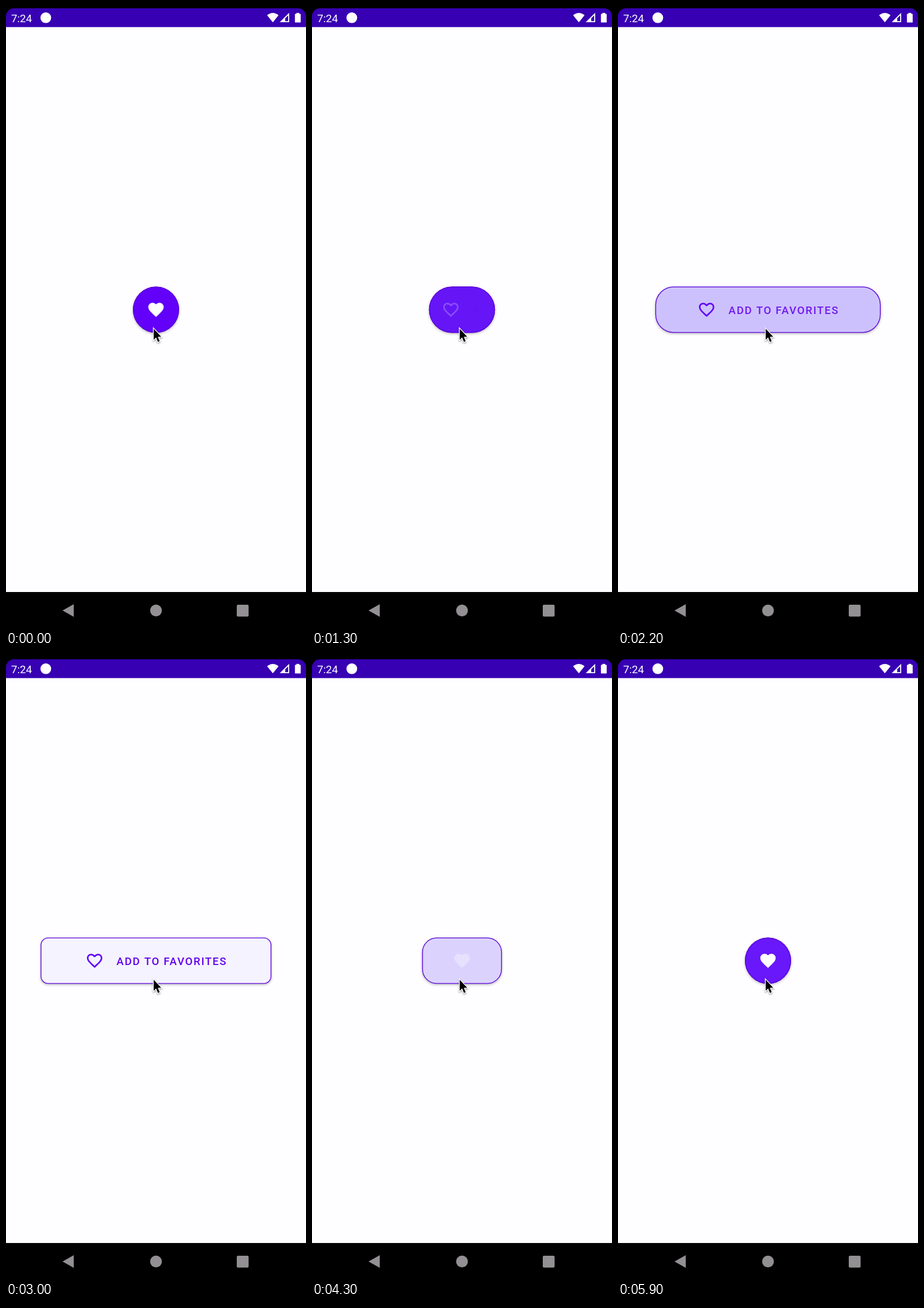
An HTML page with a canvas that plays this animation: 520x1078 px, repeating every 6000 ms.

```html
<!DOCTYPE html>
<html lang="en">
<head>
<meta charset="utf-8">
<title>Favorite button</title>
<style>
  html, body { margin: 0; width: 100%; height: 100%; overflow: hidden; background: #000; }
  canvas { display: block; }
</style>
</head>
<body>
<canvas id="stage" width="520" height="1078"></canvas>
<script>
const ctx = document.getElementById('stage').getContext('2d');
const LOOP = 6000, STEP = 100;
const EXPAND = 1025, COLLAPSE = 3495;   // finger lifts, state flips
const PRESSES = [[650, EXPAND], [3120, COLLAPSE]];
const DP = 4 / 3, CX = 260, CY = 525.5, H = 80;
const BORDER = '#5a00d8';
const GAMMA = 1.87;
const PURPLE = [0.167, -0.012, 0.965], WHITE = [1, 1, 1];

const HEART = 'M16.5 3c-1.74 0-3.41.81-4.5 2.09C10.91 3.81 9.24 3 7.5 3 4.42 3 2 5.42 2 8.5c0 3.78 3.4 6.86 8.55 11.54L12 21.35l1.45-1.31C18.6 15.36 22 12.28 22 8.5 22 5.42 19.58 3 16.5 3z';
const HOLE = 'M12.1 18.55l-.1.1-.1-.1C7.14 14.24 4 11.39 4 8.5 4 6.5 5.5 5 7.5 5c1.54 0 3.04.99 3.57 2.36h1.87C13.46 5.99 14.96 5 16.5 5c2 0 3.5 1.5 3.5 3.5 0 2.89-3.14 5.74-7.9 10.05z';
const solidHeart = new Path2D(HEART);
const lineHeart = new Path2D(HEART + HOLE);

const clamp = v => Math.min(1, Math.max(0, v));
const lerp = (a, b, p) => a + (b - a) * p;

// cubic-bezier(.4, 0, .2, 1)
function ease(v) {
  const x = clamp(v);
  let lo = 0, hi = 1, s = x;
  for (let i = 0; i < 24; i++) {
    s = (lo + hi) / 2;
    const bx = 1.2 * (1 - s) ** 2 * s + 0.6 * (1 - s) * s * s + s ** 3;
    if (bx < x) lo = s; else hi = s;
  }
  return s * s * (3 - 2 * s);
}

// 0 is the round button, 1 the wide one
function openness(t, duration) {
  const opened = ease((Math.min(t, COLLAPSE) - EXPAND) / duration);
  return opened * (1 - ease((t - COLLAPSE) / duration));
}

function mix(p) {
  const rgb = PURPLE.map((c, i) => Math.round(255 * clamp(lerp(c, WHITE[i], p)) ** (1 / GAMMA)));
  return `rgb(${rgb})`;
}

function polygon(points) {
  ctx.beginPath();
  points.forEach(([x, y]) => ctx.lineTo(x, y));
  ctx.closePath();
}

function disc(x, y, r, color) {
  ctx.fillStyle = color;
  ctx.beginPath();
  ctx.arc(x, y, r, 0, Math.PI * 2);
  ctx.fill();
}

function box(x, y, w, h, r, color) {
  ctx.fillStyle = color;
  ctx.beginPath();
  ctx.roundRect(x, y, w, h, r);
  ctx.fill();
}

function shadow(color, blur, dy) {
  ctx.shadowColor = color;
  ctx.shadowBlur = blur;
  ctx.shadowOffsetY = dy;
}

function drawHeart(path, x, color, alpha) {
  ctx.save();
  ctx.globalAlpha = clamp(alpha);
  ctx.translate(x - 12 * DP, CY - 12 * DP);
  ctx.scale(DP, DP);
  ctx.fillStyle = color;
  ctx.fill(path, 'evenodd');
  ctx.restore();
}

function drawStatusBar() {
  box(0, 0, 520, 40, 0, '#000');
  box(0, 4, 520, 40, [14, 14, 0, 0], '#3700b3');
  box(0, 36.5, 520, 977.5, 0, '#fefdff');

  ctx.fillStyle = '#fff';
  ctx.font = '400 18.67px Roboto, sans-serif';
  ctx.letterSpacing = '0px';
  ctx.fillText('7:24', 9, 27.5);
  disc(69, 20.3, 9.3, '#fff');

  ctx.beginPath();
  ctx.moveTo(462.5, 28.3);
  ctx.lineTo(452.6, 16);
  ctx.quadraticCurveTo(462.5, 8.2, 472.4, 16);
  ctx.fill();

  polygon([[474.5, 28], [490.8, 28], [490.8, 11.8]]);
  ctx.fill();
  ctx.fillStyle = '#3700b3';
  polygon([[484, 26.2], [489, 26.2], [489, 16.3], [484, 21.3]]);
  ctx.fill();

  box(500.8, 13.6, 10, 15, 1.2, '#fff');
  box(503.4, 11.9, 4.8, 3, 0, '#fff');
}

function drawNavBar() {
  box(0, 1014, 520, 64, 0, '#000');
  ctx.fillStyle = '#929092';
  polygon([[98, 1046], [117.5, 1035], [117.5, 1057]]);
  ctx.fill();
  disc(260, 1046, 10.2, '#929092');
  box(400, 1036, 20.5, 20.5, 2, '#929092');
}

function drawRipple(t, w) {
  for (const [down, up] of PRESSES) {
    if (t < down || t > up + 310) continue;
    const grow = ease((t - down) / 225);
    const fade = t < up ? clamp((t - down) / 75) : 1 - (t - up) / 310;
    const x = lerp(256, CX, grow), y = lerp(558, CY, grow);
    disc(x, y, lerp(0.3 * w, 0.5 * w + 20, grow), `rgba(0,0,0,${0.12 * fade})`);
  }
}

function drawWideContent(t, w) {
  const dt = t - EXPAND, full = 246;
  const inner = Math.min(full, w - 32 * DP);
  const left = CX - inner / 2;
  drawHeart(lineHeart, left + 12 * DP + 0.6, mix(1 - ease(dt / 1000)), dt / 900);

  ctx.save();
  ctx.beginPath();
  ctx.rect(left + 54, CY - 20, Math.max(0, inner - 53), 40);
  ctx.clip();
  ctx.globalAlpha = ease(dt / 2000);
  ctx.fillStyle = '#6200ee';
  ctx.font = '500 18.67px Roboto, sans-serif';
  ctx.letterSpacing = '1.67px';
  ctx.fillText('ADD TO FAVORITES!', left + 54.6, 533);
  ctx.restore();
}

function drawButton(t) {
  const w = lerp(80, 400, openness(t, 1500));
  const tone = openness(t, 3000);
  const r = Math.min(H / 2, lerp(50, 6, tone) * DP);
  const x = CX - w / 2, y = CY - H / 2;
  const lift = Math.max(...PRESSES.map(([down, up]) =>
    clamp((t - down) / 120) * (1 - clamp((t - up) / 150))));

  ctx.save();
  shadow(`rgba(0,0,0,${lerp(0.3, 0.34, lift)})`, lerp(4, 18, lift), lerp(1.6, 8, lift));
  // a finished collapse rests on the pure tone at the loop start
  box(x, y, w, H, r, mix(tone));
  ctx.restore();

  ctx.save();
  ctx.beginPath();
  ctx.roundRect(x, y, w, H, r);
  ctx.clip();
  if (t < EXPAND) {
    drawHeart(solidHeart, CX, '#fff', 1);
  } else if (t < COLLAPSE) {
    drawWideContent(t, w);
  } else {
    const p = ease((t - COLLAPSE) / 1500);
    drawHeart(solidHeart, CX, mix(p), p);
  }
  drawRipple(t, w);
  ctx.restore();

  ctx.strokeStyle = BORDER;
  ctx.lineWidth = DP;
  ctx.beginPath();
  ctx.roundRect(x + DP / 2, y + DP / 2, w - DP, H - DP, r - DP / 2);
  ctx.stroke();
}

function drawCursor() {
  polygon([[256, 558.5], [256, 577.5], [260.2, 573.6], [263.4, 581.2],
    [266.4, 580], [263.2, 572.4], [269, 572.2]]);
  ctx.save();
  shadow('rgba(0,0,0,.4)', 3, 1.5);
  ctx.strokeStyle = '#fff';
  ctx.lineWidth = 2.6;
  ctx.lineJoin = 'miter';
  ctx.stroke();
  ctx.restore();
  ctx.fillStyle = '#000';
  ctx.fill();
}

function draw(now) {
  const t = Math.floor((now % LOOP) / STEP) * STEP;
  drawStatusBar();
  drawButton(t);
  drawCursor();
  drawNavBar();
  requestAnimationFrame(draw);
}
requestAnimationFrame(draw);
</script>
</body>
</html>
```
